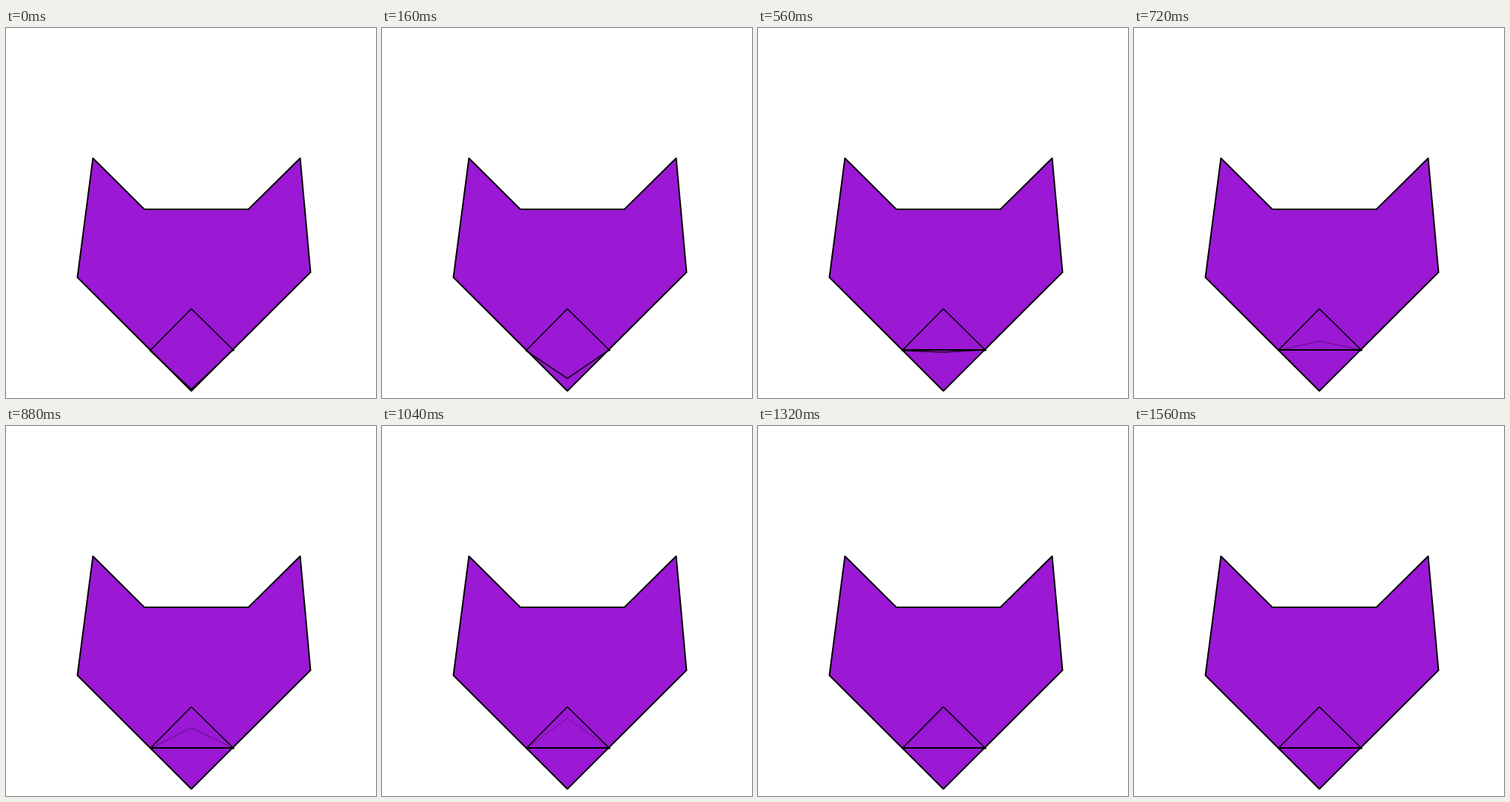
Write an HTML page that moves like this. It is 500 by 500 pixels and loops after 1.88 s.

```html
<!DOCTYPE html>
<html>
<head>
<meta charset="utf-8">
<title>Folding paper cat</title>
<style>
  html, body { margin: 0; width: 100%; height: 100%; overflow: hidden; background: #fff; }
  svg { display: block; width: 100vw; height: 100vh; }
  path { fill: none; stroke: #000; stroke-width: 1.8; stroke-linejoin: round; stroke-linecap: round; }
</style>
</head>
<body>
<svg viewBox="0 0 500 500">
  <path d="M117.5 176 187 245 327.5 245 397.5 176 411.5 330 250.5 490.5 96.5 337Z" style="fill:#9b18d4;stroke-width:2"/>
  <path d="M195 435.5 250.5 379.5 307 435" style="stroke-width:1.6"/>
  <path id="crease" d="M195 435 307 435"/>
  <path id="flap"/>
  <circle cx="307" cy="435.3" r="1.5"/>
</svg>
<script>
const LOOP = 1880, STEP = 40, FOLD = 560;
const flap = document.getElementById('flap');
const crease = document.getElementById('crease');

// Height of the flap's tip: [time, y]
const tipKeys = [[0, 488], [320, 459], [560, 438], [880, 408], [1040, 395], [1320, 385], [1560, 379.5]];

function tipAt(t) {
  const i = tipKeys.findIndex(key => key[0] > t);
  if (i < 0) return tipKeys[tipKeys.length - 1][1];
  const [t0, y0] = tipKeys[i - 1], [t1, y1] = tipKeys[i];
  return y0 + (y1 - y0) * (t - t0) / (t1 - t0);
}

function draw(now) {
  const t = Math.floor(now % LOOP / STEP) * STEP;
  const behind = t > FOLD;
  flap.setAttribute('d', `M194.5 436 250.5 ${tipAt(t)} 307 435`);
  flap.style.strokeWidth = behind ? 1.4 : 1.7;
  flap.style.opacity = behind ? Math.max(0, 0.36 * (1560 - t) / 1000) : 0.85;
  crease.style.opacity = t >= FOLD ? 1 : 0;
}

const start = performance.now();
function tick() {
  draw(performance.now() - start);
  requestAnimationFrame(tick);
}
tick();
</script>
</body>
</html>
```
